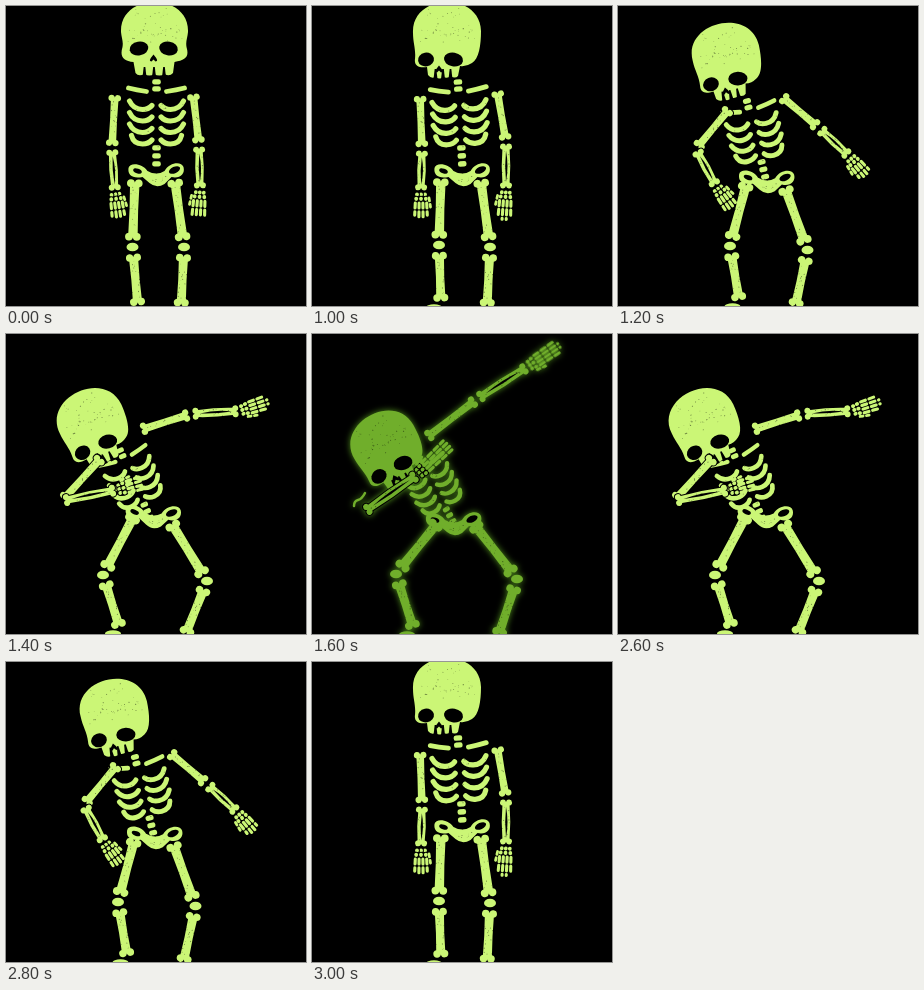
Write an HTML page that moves like this. It is 300 px wide and 300 px high and loops after 3.2 s.

```html
<!DOCTYPE html>
<html lang="en">
<head>
<meta charset="utf-8">
<title>Dancing skeleton</title>
<style>
  html, body { margin: 0; width: 100%; height: 100%; overflow: hidden; background: #000; }
  svg { display: block; width: 100vw; height: 100vh; }
</style>
</head>
<body>
<svg viewBox="0 0 300 300"><rect width="300" height="300"/><g id="figure"></g></svg>
<script>
const figure = document.getElementById('figure');

// Joints run from the body outwards: shoulder, elbow, wrist, fingertip / hip, knee, ankle.
const rest = {
  front: true,
  skull: [148.5, 27, 0], torso: [150.5, 163, 0, 1], pelvis: [150.5, 167, 0],
  armL: [[109, 88], [106, 142], [109, 185], [113, 214]],
  armR: [[187, 87], [193, 139], [194, 183], [192, 214]],
  legL: [[129, 172], [126.5, 241], [132, 301]],
  legR: [[168.5, 172], [178, 241], [175, 302]]
};
const glance = {
  skull: [135, 27, 0], torso: [150.5, 163, -3, 1], pelvis: [150.5, 167, 0],
  armL: [[108, 89], [110, 143], [109, 185], [109, 214]],
  armR: [[185, 84], [194, 136], [194, 183], [192, 216]],
  legL: [[129, 171], [127, 239], [129, 297]],
  legR: [[168.5, 172], [178, 241], [175, 302]]
};
const dip = {
  skull: [85, 86, -24], torso: [146, 188, -24, 0.9], pelvis: [147.5, 181, 3],
  armL: [[96, 123], [56, 167], [110, 156], [139, 148]],
  armR: [[134, 96], [185, 80], [233, 77], [264, 67]],
  legL: [[129, 180], [97, 241], [114, 295]],
  legR: [[164, 187], [201, 247], [179, 302]]
};
const dab = {
  glow: true,
  skull: [72.5, 109, -29], torso: [143, 191, -29, 0.85], pelvis: [142, 188, 0],
  armL: [[53, 159], [52, 178], [105, 141], [139, 108]],
  armR: [[114, 104], [165, 65], [215, 33], [249, 10]],
  legL: [[127, 187], [84, 240], [102, 296]],
  legR: [[161, 189], [205, 245], [186, 303]]
};
const mix = (a, b) => a.map((v, i) => Array.isArray(v) ? mix(v, b[i]) : (v + b[i]) / 2);
const swing = {
  skull: [108, 48, -12],
  torso: mix(glance.torso, dip.torso),
  pelvis: mix(glance.pelvis, dip.pelvis),
  armL: [[112, 102], [78, 143], [98, 180], [115, 204]],
  armR: [[163, 90], [201, 122], [231, 150], [249, 171]],
  legL: mix(glance.legL, dip.legL),
  legR: mix(glance.legR, dip.legR)
};

const steps = [
  [rest, 1000], [glance, 200], [swing, 200], [dip, 200],
  [dab, 1000], [dip, 200], [swing, 200], [glance, 200]
];
const loop = steps.reduce((sum, s) => sum + s[1], 0);

let seed;
const rnd = () => (seed = (seed * 16807) % 2147483647) / 2147483647;

const path = (d, extra = '') => `<path d="${d}" ${extra}/>`;
const line = (d, w, extra = '') =>
  path(d, `fill="none" stroke="currentColor" stroke-width="${w}" stroke-linecap="round" ${extra}`);
const oval = (x, y, rx, ry, extra = '') =>
  `<ellipse cx="${x}" cy="${y}" rx="${rx}" ry="${ry}" ${extra}/>`;
const place = (x, y, angle, body, scale = 1) =>
  `<g transform="translate(${x} ${y}) rotate(${angle}) scale(${scale})">${body}</g>`;

// Worn-print specks scattered over a box.
function specks(n, x, y, w, h) {
  let out = '';
  for (let i = 0; i < n; i++) {
    const r = 0.2 + rnd() * 0.35;
    out += oval(x + rnd() * w, y + rnd() * h, r * 1.3, r);
  }
  return `<g fill="#000" stroke="none" opacity=".45">${out}</g>`;
}

function along(a, b, draw) {
  const dx = b[0] - a[0], dy = b[1] - a[1];
  return place(a[0], a[1], Math.atan2(dy, dx) * 180 / Math.PI, draw(Math.hypot(dx, dy)));
}

// A shaft with two lobes at each end, trimmed to leave gaps at the joints.
// A split shaft bulges around a dark slit, like the two bones of a forearm.
function bone(a, b, w, start, end, split) {
  return along(a, b, len => {
    const l = len - start - end, h = w * 0.45, r = w * 0.38, m = w * (split ? 0.62 : 0.38);
    const arc = (x, y) => `A${r} ${r} 0 1 1 ${x} ${y}`;
    const shaft = path(`M${h} ${-h}Q${l / 2} ${-m} ${l - h} ${-h}${arc(l, 0)}${arc(l - h, h)}` +
      `Q${l / 2} ${m} ${h} ${h}${arc(0, 0)}${arc(h, -h)}Z`);
    const slit = split
      ? path(`M${l * 0.12} 0Q${l / 2} -3 ${l * 0.9} 0Q${l / 2} 1.6 ${l * 0.12} 0Z`, 'fill="#000" stroke="none"')
      : '';
    return place(start, 0, 0, shaft + slit + specks(w * 1.6, h, -h, l - 2 * h, 2 * h));
  });
}

function hand(wrist, tip, side) {
  return along(wrist, tip, len => {
    let out = '';
    for (const x of [3.5, 7.8])
      for (const y of [-4, 0, 4]) out += oval(x, y * (x > 5 ? 1.2 : 1), 2.1, 1.9);
    for (let i = -1.5; i < 2; i++)
      out += line(`M12 ${i * 3.8}L${len - 1.5 - Math.abs(i) * 2.2} ${i * 4.2}`, 3.1,
        'stroke-dasharray="5 3.8"');
    return out + line(`M7 ${side * 8}L16 ${side * 9.5}`, 2.8, 'stroke-dasharray="3 3.4"');
  });
}

function arm([shoulder, elbow, wrist, tip], side) {
  const reach = Math.hypot(elbow[0] - shoulder[0], elbow[1] - shoulder[1]);
  const upper = reach < 25
    ? line(`M${shoulder}Q50 165 46 166T42 172`, 2.5)
    : bone(shoulder, elbow, 8.4, 3.5, 4.5);
  return upper + bone(elbow, wrist, 8, 4, 3, true) + hand(wrist, tip, side);
}

function leg([hip, knee, ankle]) {
  return bone(hip, knee, 10.4, 4.5, 9.5) + oval(knee[0], knee[1], 6, 4.3) +
    bone(knee, ankle, 10, 10, 4.5) + oval(ankle[0] - 7, ankle[1] + 4.5, 8, 3.2);
}

function torso() {
  let out = '';
  for (const y of [-87, -80, -21, -13, -5])
    out += `<rect x="-4.3" y="${y - 2.8}" width="8.6" height="5.4" rx="2.3"/>`;
  for (const s of [-1, 1]) {
    out += line(`M${s * 28} -81Q${s * 20} -79 ${s * 10} -77.5`, 4.8);
    for (let i = 0; i < 4; i++) {
      const y = -68 + i * 11.5, x = 27 - (i === 3 ? 2 : 0);
      out += line(`M${s * x} ${y}Q${s * 23} ${y + 8.5} ${s * 14} ${y + 8.5}Q${s * 8} ${y + 8.5} ${s * 4.6} ${y + 4.5}`, 5.2);
    }
  }
  return out + specks(24, -28, -66, 56, 44);
}

function pelvis() {
  return path('M-28-5C-27-11-14-10-9-2Q0 3 8-2C13-11 25-12 27-6C29 1 23 6 15 4L8 11Q0 16-7 10L-14 4C-24 6-29 2-28-5Z') +
    `<g fill="#000">${oval(-19, -2, 4.5, 2.3, 'transform="rotate(20 -19 -2)"')}` +
    `${oval(18, -3, 6, 3.2, 'transform="rotate(-25 18 -3)"')}</g>` + specks(12, -10, -1, 20, 11);
}

function skull(front) {
  const eyeY = front ? 15.5 : 26.5, jaw = front ? 42 : 44;
  const shape = front
    ? 'M-33.5-1C-35-41 35-41 33.5-1C33 5 31 8 32 14C35 24 31 27 20 29L18.5 40Q15 44 10 41Q5 44-.5 41Q-5 44-10 41Q-16 44-19 40L-21 29C-31 28-35 24-32 14C-31 8-33 5-33.5-1Z'
    : 'M-34 0C-36-40 33-42 34-2C34 12 32 26 25 30Q19 34 13 33L11 43Q8 46 3.5 43Q1 46-4 44Q-7 47-11.5 44Q-16 46-19 42L-20 34C-28 35-33 33-32 26C-31 16-34 10-34 0Z';
  const eyes = front ? [-15.5, 14] : [-21, 6.5];
  const nose = front ? -1 : -8, ny = eyeY + 7;
  const gaps = front ? [-10, -0.5, 9.5] : [-11.5, -4, 3.5];
  let holes = '';
  eyes.forEach((x, i) => {
    const wide = front ? 9.4 : 8 + i * 1.6;
    holes += oval(x, eyeY, wide, 6.9, `transform="rotate(${i ? 10 : -10} ${x} ${eyeY})"`);
  });
  holes += path(`M${nose} ${ny - 1}Q${nose - 6} ${ny + 6} ${nose - 2} ${ny + 6}L${nose} ${ny + 4}L${nose + 2} ${ny + 6}Q${nose + 6} ${ny + 6} ${nose} ${ny - 1}Z`);
  for (const x of gaps)
    holes += path(`M${x - 2} ${jaw + 2}L${x - 0.8} ${jaw - 8}H${x + 0.8}L${x + 2} ${jaw + 2}Z`);
  return path(shape) + `<g fill="#000">${holes}</g>` +
    specks(32, -28, -8, 56, 18) + specks(18, -20, -26, 42, 24);
}

function draw(p) {
  seed = 77;
  const ink = p.glow ? '#70ae2b' : '#cbf676';
  const light = p.glow ? 'style="filter:drop-shadow(0 0 3px #4f8c1c)"' : '';
  const [tx, ty, ta, ts] = p.torso;
  return `<g fill="${ink}" color="${ink}" ${light}>` +
    place(tx, ty, ta, torso(), ts) + place(...p.pelvis, pelvis()) +
    leg(p.legL) + leg(p.legR) + arm(p.armR, 1) +
    place(...p.skull, skull(p.front)) +
    `<g stroke="#000" stroke-width="2" paint-order="stroke">${arm(p.armL, -1)}</g></g>`;
}

let shown;
function render(time) {
  let t = time % loop, i = 0;
  while (t >= steps[i][1]) t -= steps[i++][1];
  const pose = steps[i][0];
  if (pose !== shown) figure.innerHTML = draw(shown = pose);
}

const began = performance.now();
function tick() {
  render(performance.now() - began);
  requestAnimationFrame(tick);
}
tick();
</script>
</body>
</html>
```
